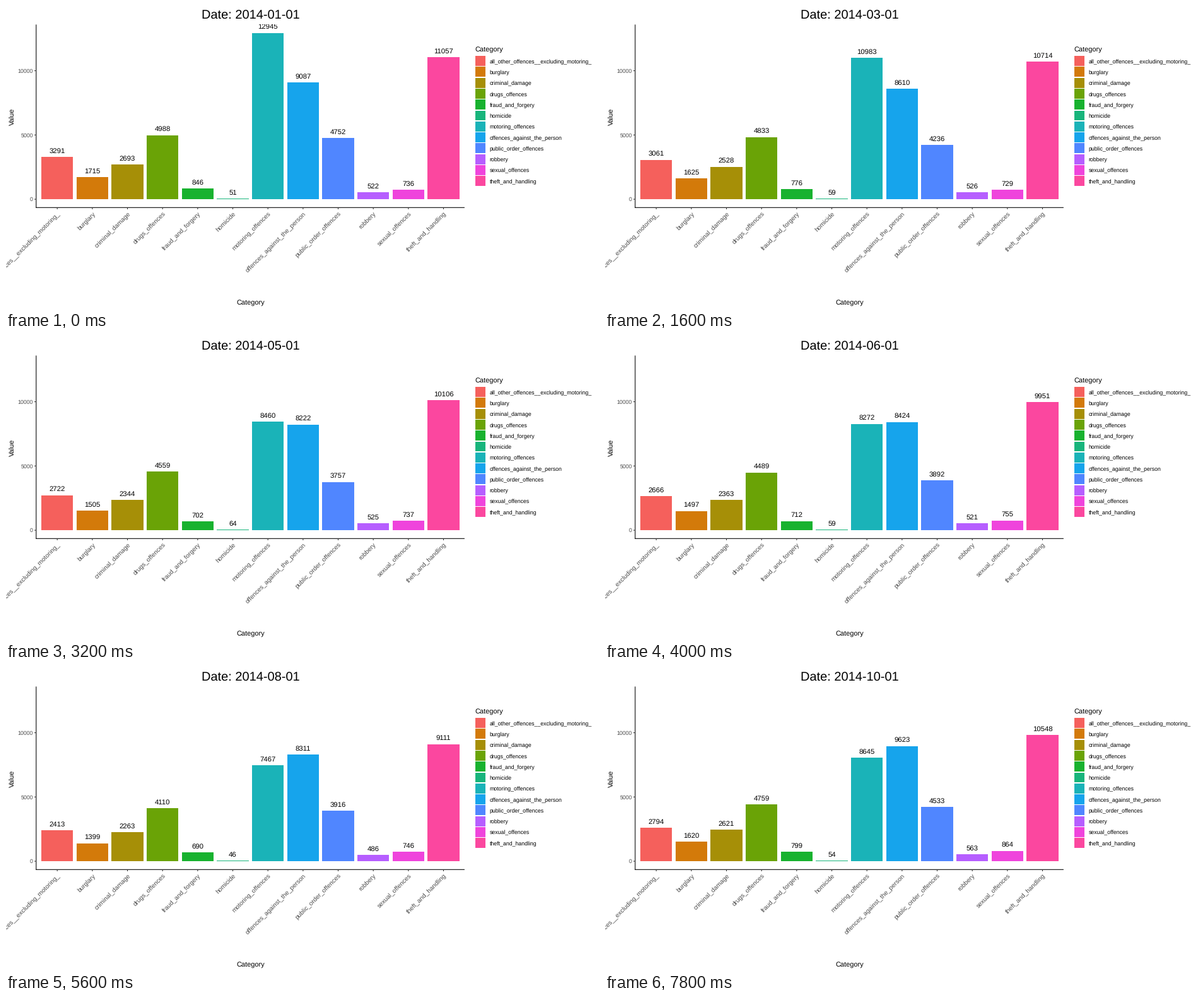
Write a matplotlib script that moves like this. It is 940 px wide and 480 px high and loops after 8 s.

```python
import matplotlib.pyplot as plt
import numpy as np
from matplotlib.animation import FuncAnimation
from matplotlib.patches import Rectangle

plt.rcParams.update({"font.family": "Liberation Sans", "text.hinting": "none"})

WIDTH, HEIGHT, DPI = 940, 480, 100
LEFT, RIGHT, TOP, BOTTOM = 47.8, 726.9, 29.4, 319.3
STEP = (RIGHT - LEFT) / 12.2
ZERO, SCALE = 306.1, 0.02036
HOLD, PERIOD, MONTHS = 3, 4, 10
GREY = "#4d4d4d"

# Name, colour, January value, and level relative to it by spring and by late summer.
CATEGORIES = [
    ("all_other_offences__excluding_motoring_", "#f5605c", 3291, 0.91, 0.89),
    ("burglary", "#d37a0a", 1715, 0.95, 0.99),
    ("criminal_damage", "#a68f07", 2693, 0.93, 1.02),
    ("drugs_offences", "#6aa306", 4988, 1.0, 1.0),
    ("fraud_and_forgery", "#18b22f", 846, 0.88, 0.99),
    ("homicide", "#18b57c", 51, 1.45, 1.1),
    ("motoring_offences", "#1ab3b8", 12945, 0.72, 0.7),
    ("offences_against_the_person", "#16a4ec", 9087, 0.95, 1.11),
    ("public_order_offences", "#5086ff", 4752, 0.82, 1.0),
    ("robbery", "#b65eff", 522, 1.09, 1.13),
    ("sexual_offences", "#ef44dc", 736, 1.05, 1.23),
    ("theft_and_handling", "#fb479f", 11057, 1.0, 1.0),
]
NAMES, COLORS, START, SPRING, LATE = zip(*CATEGORIES)
START, SPRING, LATE = map(np.array, (START, SPRING, LATE))

# Overall monthly activity shared by every category.
ACTIVITY = [1, 0.967, 0.969, 0.908, 0.914, 0.9, 0.99, 0.824, 0.908, 0.954, 0.824]

fig = plt.figure(figsize=(WIDTH / DPI, HEIGHT / DPI), dpi=DPI, facecolor="white")
ax = fig.add_axes([0, 0, 1, 1])
ax.set(xlim=(0, WIDTH), ylim=(HEIGHT, 0))
ax.axis("off")


def month_values(month):
    early = min(month / 3, 1) ** 2
    late = np.clip((month - 3) / 4, 0, 1)
    level = 1 + (SPRING - 1) * early + (LATE - SPRING) * late
    return np.rint(START * level * ACTIVITY[month]).astype(int)


def write(x, y, text, size, color="black", ha="center", angle=0):
    return ax.text(x, y, text, fontsize=size * 72 / DPI, color=color, ha=ha,
                   va="baseline", rotation=angle, rotation_mode="anchor")


def line(xs, ys, color="black"):
    ax.plot(xs, ys, color=color, lw=1.07 * 72 / DPI, solid_capstyle="butt",
            zorder=3, snap=False)


def box(x, y, w, h, color):
    return ax.add_patch(Rectangle((x, y), w, h, fc=color, lw=0))


def draw_axes():
    line([LEFT, LEFT], [TOP, BOTTOM + 0.5])
    line([LEFT - 0.5, RIGHT], [BOTTOM, BOTTOM])
    for value in (0, 5000, 10000):
        y = ZERO - value * SCALE
        line([LEFT - 2.75, LEFT], [y, y], "#333333")
        write(42.9, y + 3.2, str(value), 8.8, GREY, "right")
    for x, name in zip(centers, NAMES):
        line([x, x], [BOTTOM, BOTTOM + 2.75], "#333333")
        write(x + 5.1, 329.5, name, 10, GREY, "right", 45)
    write(middle, 473, "Category", 11)
    write(14.2, 175.3, "Value", 11, angle=90)


def draw_legend():
    write(743.4, 72.2, "Category", 11, ha="left")
    for i, (name, color) in enumerate(zip(NAMES, COLORS)):
        y = 87.14 + 17.28 * i
        box(744, y - 8, 15.9, 15.9, color)
        write(766.8, y + 3.7, name, 8.8, ha="left")


middle = (LEFT + RIGHT) / 2
centers = LEFT + STEP * (0.6 + np.arange(len(CATEGORIES)))
draw_axes()
draw_legend()
title = write(middle, 20.8, "", 20)
bars = [box(x - 0.45 * STEP, ZERO, 0.9 * STEP, 0, color)
        for x, color in zip(centers, COLORS)]
labels = [write(x, ZERO, "", 11.38) for x in centers]
panel = Rectangle((LEFT, TOP), RIGHT - LEFT, BOTTOM - TOP, transform=ax.transData)
for label in labels:
    label.set_clip_on(True)
    label.set_clip_path(panel)


def update(frame):
    month, phase = divmod(frame, PERIOD)
    blend = 0.5 if phase >= HOLD else 0
    current = month_values(month)
    heights = (current + (month_values(month + 1) - current) * blend) * SCALE
    title.set_text(f"Date: 2014-{month + 1:02d}-01")
    for bar, label, height, value in zip(bars, labels, heights, current):
        bar.set_y(ZERO - height)
        bar.set_height(height)
        label.set_y(ZERO - height - 6.4)
        label.set_text(str(value))
    return [title, *bars, *labels]


anim = FuncAnimation(fig, update, frames=MONTHS * PERIOD, interval=200,
                     repeat=True, repeat_delay=0)
plt.show()
```
